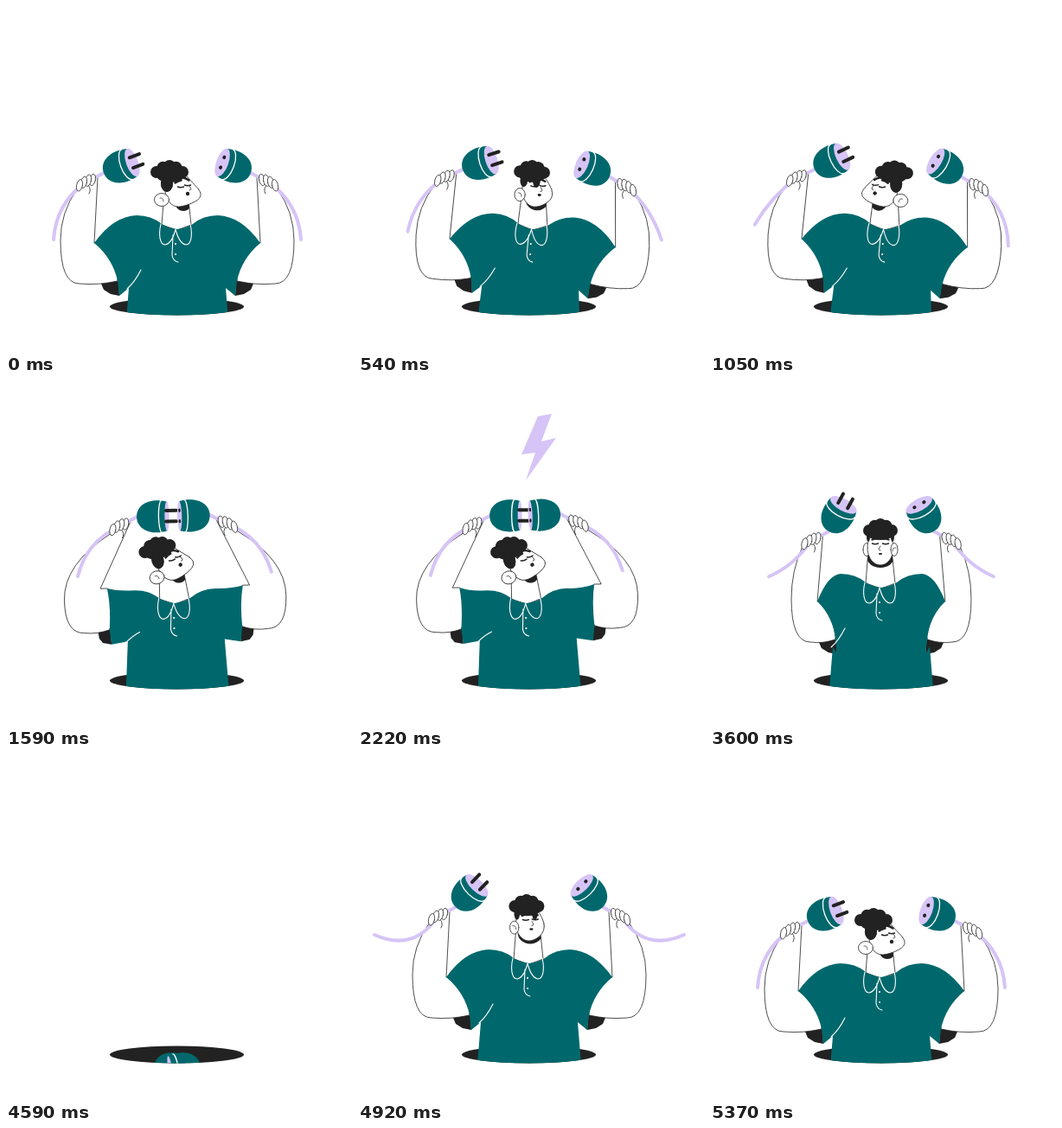
An HTML page with a canvas that plays this animation: 400 by 400 pixels, repeating every 5400 ms.

```html
<!DOCTYPE html>
<html lang="en">
<head>
<meta charset="utf-8">
<title>Plug and socket</title>
<style>
html, body { margin: 0; width: 100%; height: 100%; overflow: hidden; background: #fff; }
canvas { display: block; width: 400px; height: 400px; }
</style>
</head>
<body>
<canvas id="stage"></canvas>
<script>
const canvas = document.getElementById('stage');
const ctx = canvas.getContext('2d');
const dpr = window.devicePixelRatio || 1;
canvas.width = canvas.height = 400 * dpr;

const TEAL = '#00686c', LILAC = '#d6c4f6', DARK = '#222222', WHITE = '#ffffff';
const LOOP = 5400, CENTER = 198, FLOOR = 347.5;
const GONE = 4020, BACK = 4590;
const NECK = 253;

// The two arm poses, left side; the right side is a mirror image.
const open = { hand: [92, 204], corner: [102, 274], outer: [63, 271], hem: [129, 318], end: [55, 270] };
const joined = { hand: [136, 167], corner: [112, 238], outer: [70, 251], hem: [121, 286], end: [87, 223] };

const lerp = (a, b, u) => a + (b - a) * u;
const mix = (a, b, u) => a.map((v, i) => lerp(v, b[i], u));
const clamp = u => Math.max(0, Math.min(1, u));
const smooth = u => u * u * (3 - 2 * u);
const ramp = (t, from, to) => smooth(clamp((t - from) / (to - from)));
const pulse = (t, a, b, c, d) => ramp(t, a, b) - ramp(t, c, d);

function poseAt(t) {
  const hidden = pulse(t, 3600, GONE, BACK, 4900);
  const tall = pulse(t, 3390, 3600, BACK, 4880);
  const fall = clamp((t - 3600) / (GONE - 3600)) ** 2;
  const leap = 1 - (1 - clamp((t - BACK) / 330)) ** 3;
  const land = ramp(t, 4920, 5160);
  const meet = pulse(t, 1080, 1650, 2300, 2700);
  const droop = pulse(t, 2300, 2850, 3390, 3600);
  const strain = meet * Math.sin((t - 1650) / 95);
  const flung = tall * .55 + hidden * .45 + ramp(t, BACK, 4880) - land;
  return {
    join: meet + hidden,
    squeeze: 1 - .23 * tall + .02 * droop,
    drop: -4 * droop - 18 * ramp(t, 3390, 3600) + 224 * fall - 226 * leap + 20 * land + 4 * leap * (1 - land),
    lean: .05 * pulse(t, 0, 330, 1080, 1600) - .025 * meet,
    angle: -20 - 8 * pulse(t, 400, 1050, 1080, 1500) + 21 * meet - 17 * droop - 41 * tall
      + 71 * hidden - 26 * (ramp(t, BACK, 4880) - land),
    turn: 1 - 2 * pulse(t, 400, 820, 1100, 1550) - .92 * ramp(t, 2350, 2850)
      - .08 * ramp(t, 3390, 3600) + ramp(t, 4800, 5160),
    tilt: -14 * meet + 12 * droop + strain * .6,
    shrug: 6 * droop,
    headX: CENTER - 1 - 6 * meet + 2 * droop,
    flingL: flung + .22 * pulse(t, 450, 780, 1080, 1400) + .13 * pulse(t, 500, 780, 780, 1050),
    flingR: flung + .4 * pulse(t, 30, 330, 330, 700)
  };
}

function armPoints(pose, fling) {
  const a = {};
  for (const name in open) {
    const [x, y] = mix(open[name], joined[name], pose.join);
    a[name] = [CENTER + (x - CENTER) * pose.squeeze, y];
  }
  a.end = [a.end[0] - 36 * fling, a.end[1] - 45 * fling];
  a.bend = 9 - 25 * fling;
  a.base = [a.hand[0] + 21, a.hand[1] - 11];
  a.wrist = [a.hand[0] + 14, a.hand[1] - 6];
  return a;
}

function fill(color) { ctx.fillStyle = color; ctx.fill(); }

function stroke(color = DARK, width = .8) {
  ctx.strokeStyle = color;
  ctx.lineWidth = width;
  ctx.stroke();
}

function poly(points) {
  ctx.beginPath();
  points.forEach(p => ctx.lineTo(...p));
  ctx.closePath();
}

function oval(x, y, rx, ry, angle = 0, from = 0, to = Math.PI * 2) {
  ctx.beginPath();
  ctx.ellipse(x, y, rx, ry, angle, from, to);
}

function local(draw) {
  ctx.save();
  draw();
  ctx.restore();
}

// Draws the left side, then the same mirrored.
function bothSides(draw, left, right) {
  draw(left, true);
  local(() => {
    ctx.translate(2 * CENTER, 0);
    ctx.scale(-1, 1);
    draw(right, false);
  });
}

function arm({ hand: [hx, hy], corner, outer: [ox, oy], hem: [mx, my], wrist }, join) {
  poly([[mx + 1, my - 2], [mx - 19 + 6 * join, my + 3], [mx - 16 + 4 * join, my + 10], [mx - 8, my + 15], [mx + 2, my + 17]]);
  fill(DARK);
  const sx = hx - 10, sy = hy + 8, low = my + 3;
  const outline = () => {
    ctx.moveTo(sx, sy);
    ctx.quadraticCurveTo(ox, sy + (oy - sy) * .45, ox, oy);
    ctx.quadraticCurveTo(ox, low, ox + 22, low);
    ctx.quadraticCurveTo((ox + 22 + mx) / 2, low + 2, mx, my);
  };
  ctx.beginPath();
  outline();
  ctx.lineTo(...corner);
  ctx.lineTo(...wrist);
  fill(WHITE);
  ctx.beginPath();
  outline();
  ctx.moveTo(...wrist);
  ctx.lineTo(...corner);
  ctx.lineTo(corner[0] + 8, corner[1]);
  stroke();
}

function halfShirt({ corner, hem: [mx, my] }, fold, { join, shrug }) {
  const kx = corner[0] + 8 * join, ky = corner[1];
  const sx = 151, sy = NECK - 11 - shrug, pit = my + 8 + 6 * join;
  ctx.beginPath();
  ctx.moveTo(kx, ky);
  ctx.quadraticCurveTo(kx + (sx - kx) * .45, sy + 1, sx, sy);
  ctx.quadraticCurveTo(168, sy, CENTER - 18, NECK - 1);
  ctx.quadraticCurveTo(CENTER - 10, NECK + 4, CENTER + .5, NECK + 5);
  ctx.lineTo(CENTER + .5, 400);
  ctx.lineTo(136, 400);
  ctx.lineTo(142, pit);
  ctx.lineTo(mx + 2, my + 17);
  ctx.lineTo(mx, my);
  ctx.quadraticCurveTo((kx + mx) / 2 + 8 - 5 * join, (ky + my) / 2 - 4, kx, ky);
  fill(TEAL);
  if (!fold) return;
  ctx.beginPath();
  ctx.moveTo(140, pit + 1);
  ctx.quadraticCurveTo(149, pit - 7, 156, pit - 21 + 11 * join);
  stroke(WHITE, 1.1);
}

function collar() {
  const x = CENTER - 2, y = NECK;
  ctx.beginPath();
  for (const s of [-1, 1]) {
    ctx.moveTo(x + s * 17, y - 1);
    ctx.bezierCurveTo(x + s * 20, y + 12, x + s * 18, y + 23, x + s * 12, y + 23);
    ctx.bezierCurveTo(x + s * 6, y + 22, x + s * 2, y + 13, x, y + 5);
  }
  ctx.moveTo(x - 3, y + 12);
  ctx.lineTo(x - 4, y + 35);
  ctx.quadraticCurveTo(x - 3, y + 42, x + 3, y + 43);
  stroke(WHITE, 1.1);
  for (const dy of [22, 34]) {
    oval(x, y + dy, 1.1, 1.1);
    fill(WHITE);
  }
}

// An oval that grows a jutting chin as the head turns sideways.
function facePath(k) {
  const points = [];
  for (let i = 0; i < 48; i++) {
    const a = i / 48 * Math.PI * 2;
    const chin = 12 * Math.max(0, Math.cos(a - .4)) ** 4;
    points.push([15 * Math.cos(a) + k * (2 + chin), 20 * Math.sin(a)]);
  }
  poly(points);
}

function hair(k) {
  oval(-7 * k, -17 + k, 16, 8);
  fill(DARK);
  for (let u = -1; u <= 1; u += .5) {
    oval(-8 * k + (13 + 2 * k) * u, -20 - 7 * (1 - u * u), 7, 7);
    fill(DARK);
  }
  for (const s of [-1, 1]) {
    oval(s * 14 * (1 - k) - 11 * k, lerp(-13, -7, k), 2 + 5 * k, lerp(6, 10, k));
    fill(DARK);
  }
}

function ear(x, y, rx) {
  oval(x, y, rx, 7.5);
  fill(WHITE);
  stroke();
}

function features(k) {
  const at = (front, side) => mix(front, side, k);
  const brows = [at([-6, -10], [2, -9]), at([6, -10], [11, -12])];
  const eyes = [at([-6, -5], [5, -3]), at([6, -5], [13, -5])];
  const nose = at([1, 2], [16, 0]);
  ctx.beginPath();
  brows.forEach(([x, y], i) => {
    const slant = (i ? -1 : 1) * (.5 + k);
    ctx.moveTo(x - 3.5, y + slant);
    ctx.quadraticCurveTo(x, y - 1, x + 3.5, y - slant);
  });
  stroke(DARK, 2.4);
  ctx.beginPath();
  for (const [x, y] of eyes) {
    ctx.moveTo(x - 3.5, y);
    ctx.quadraticCurveTo(x, y + 1.5, x + 3.5, y);
  }
  stroke(DARK, 1.5);
  ctx.beginPath();
  ctx.moveTo(nose[0] - 1, nose[1] - 4);
  ctx.quadraticCurveTo(nose[0] + 3, nose[1] + 1, nose[0] - 1, nose[1] + 1);
  stroke();
  oval(...at([0, 7], [13, 5]), 2.2, 1 + 1.2 * k);
  fill(DARK);
}

function placeHead({ headX, tilt, turn }) {
  ctx.translate(headX, NECK - 41);
  ctx.rotate(tilt * Math.PI / 180);
  ctx.scale(turn < 0 ? -1 : 1, 1);
}

function neck(pose) {
  const x = lerp(CENTER, pose.headX, .4);
  poly([[CENTER - 18, NECK], [x - 15, NECK - 33], [x + 13, NECK - 33], [CENTER + 16, NECK], [CENTER, NECK + 6]]);
  fill(WHITE);
  stroke();
  ctx.clip();
  placeHead(pose);
  oval(...mix([0, 10, 16, 13], [8, 14, 10, 11], Math.abs(pose.turn)));
  fill(DARK);
}

function head(pose) {
  const k = Math.abs(pose.turn);
  placeHead(pose);
  ear(lerp(16, 8, k), 2 + 2 * k, 4);
  facePath(k);
  fill(WHITE);
  stroke();
  hair(k);
  const x = -16 - k, y = 2 + 10 * k;
  ear(x, y, 4 + 4.5 * k);
  ctx.beginPath();
  ctx.moveTo(x - 2, y - 2);
  ctx.quadraticCurveTo(x + 2, y - 3, x + 2, y + 2);
  stroke(DARK, .7);
  features(k);
}

function cord({ base, hand: [hx, hy], end: [x, y], bend }) {
  const dx = x - hx, dy = y - hy, push = 2 * bend / Math.hypot(dx, dy);
  ctx.beginPath();
  ctx.moveTo(...base);
  ctx.quadraticCurveTo(hx + 8, hy - 4, hx, hy);
  ctx.quadraticCurveTo(hx + dx / 2 - dy * push, hy + dy / 2 + dx * push, x, y);
  stroke(LILAC, 4);
}

function plug([x, y], { angle, join }, prongs) {
  const depth = 7 - 4.5 * join;
  ctx.translate(x, y);
  ctx.rotate(angle * Math.PI / 180);
  ctx.translate(35, 0);
  ctx.beginPath();
  ctx.moveTo(0, -17);
  ctx.bezierCurveTo(-18, -22, -35, -15, -35, 0);
  ctx.bezierCurveTo(-35, 15, -18, 22, 0, 17);
  fill(TEAL);
  oval(-6, 0, depth + 1, 18.5, 0, Math.PI / 2, Math.PI * 1.5);
  stroke(WHITE, 1.3);
  oval(0, 0, depth, 17);
  fill(LILAC);
  for (const v of [-6.5, 6]) {
    if (prongs) {
      ctx.beginPath();
      ctx.moveTo(-1, v);
      ctx.lineTo(11, v);
      stroke(DARK, 4);
    } else {
      oval(0, v, Math.min(2, depth / 2), 2.2);
      fill(DARK);
    }
  }
}

function fingers([x, y]) {
  ctx.beginPath();
  ctx.moveTo(x + 3, y + 3);
  ctx.quadraticCurveTo(x + 7, y + 8, x + 4, y + 13);
  stroke();
  for (let i = 0; i < 4; i++) {
    oval(x + 8 - 5 * i, y - 3 + .7 * i * i, 3.4, 6.8, .22);
    fill(WHITE);
    stroke();
  }
}

function bolt(t) {
  const top = lerp(39, 117, ramp(t, 2340, 2550));
  const bottom = lerp(39, 117, ramp(t, 1620, 1830));
  if (bottom <= top) return;
  ctx.beginPath();
  ctx.rect(180, top, 60, bottom - top);
  ctx.clip();
  poly([[208, 42], [224, 39], [212, 71], [229, 67], [194, 116], [205, 84], [189, 86]]);
  fill(LILAC);
}

function clipToHole() {
  ctx.beginPath();
  ctx.rect(0, 0, 400, FLOOR);
  ctx.ellipse(197.5, FLOOR, 77.5, 10, 0, 0, Math.PI);
  ctx.clip();
}

function figure(pose) {
  const left = armPoints(pose, pose.flingL), right = armPoints(pose, pose.flingR);
  clipToHole();
  ctx.translate(CENTER, 350 + pose.drop);
  ctx.rotate(pose.lean);
  ctx.translate(-CENTER, -350);
  bothSides(a => arm(a, pose.join), left, right);
  local(() => neck(pose));
  bothSides((a, fold) => halfShirt(a, fold, pose), left, right);
  collar();
  local(() => head(pose));
  bothSides((a, prongs) => {
    cord(a);
    local(() => plug(a.base, pose, prongs));
    fingers(a.hand);
  }, left, right);
}

function draw(t) {
  ctx.setTransform(dpr, 0, 0, dpr, 0, 0);
  ctx.lineCap = ctx.lineJoin = 'round';
  ctx.fillStyle = WHITE;
  ctx.fillRect(0, 0, 400, 400);
  oval(197.5, FLOOR, 77.5, 10);
  fill(DARK);
  if (t < GONE || t >= BACK) local(() => figure(poseAt(t)));
  local(() => bolt(t));
}

const start = performance.now();
function tick() {
  draw((performance.now() - start) % LOOP);
  requestAnimationFrame(tick);
}
tick();
</script>
</body>
</html>
```
